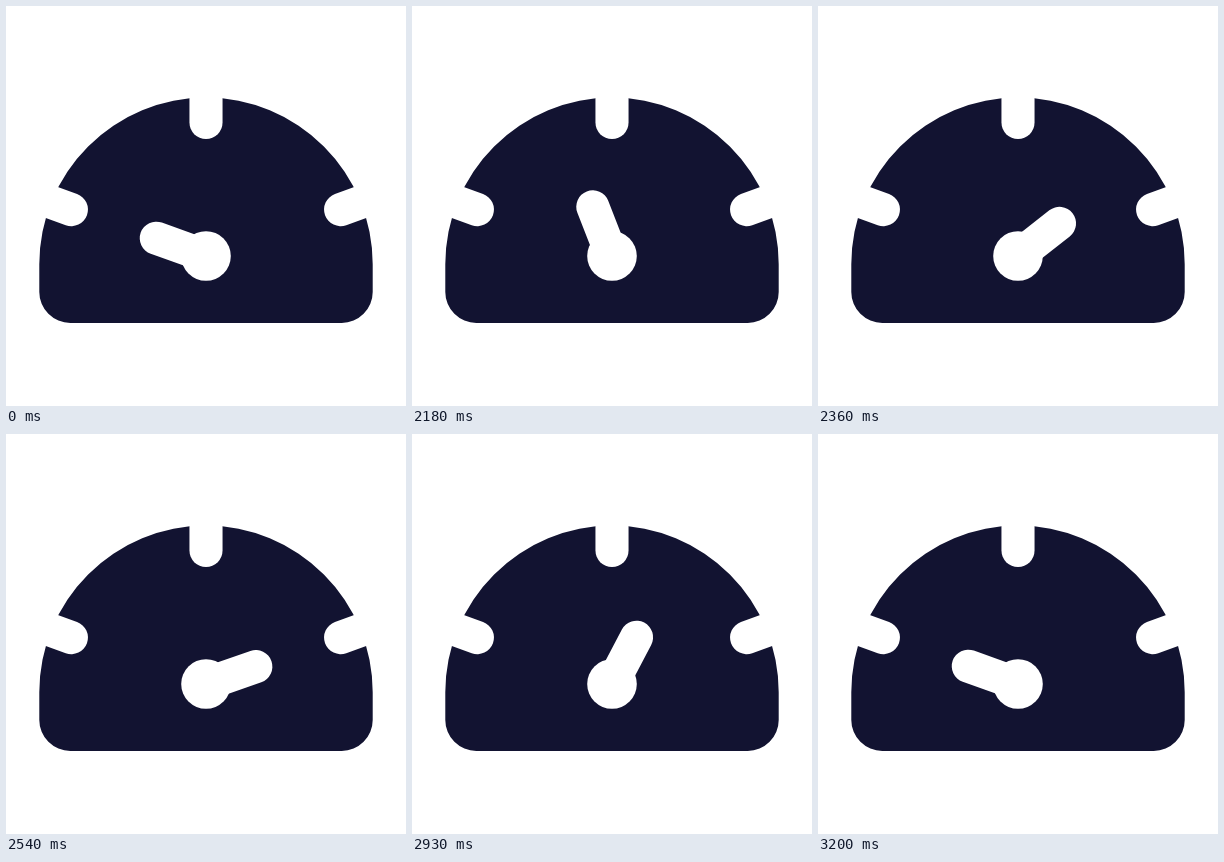
Write an HTML page with a canvas that moves like this. It is 400 by 400 pixels and loops after 3.26 s.

```html
<!DOCTYPE html>
<html lang="en">
<head>
<meta charset="utf-8">
<title>Gauge</title>
<style>
  html, body { margin: 0; width: 100%; height: 100%; overflow: hidden; background: #fff; }
  canvas { display: block; width: 400px; height: 400px; }
</style>
</head>
<body>
<canvas id="stage" width="400" height="400"></canvas>
<script>
const ctx = document.getElementById('stage').getContext('2d');

const LOOP = 3260, REST = 2000, STEP = 30;
const PEAK_STEP = 24, END_STEP = 40;
const LOW = -70.3, HIGH = 75;
const INK = '#121331', PAPER = '#fff';
const SLOT = 33.1;

// Cubic easing with flat ends; x1 and x2 are the handle positions in time.
function ease(x, x1, x2) {
  let lo = 0, hi = 1;
  for (let i = 0; i < 30; i++) {
    const u = (lo + hi) / 2, v = 1 - u;
    if (3 * u * v * v * x1 + 3 * u * u * v * x2 + u * u * u < x) lo = u;
    else hi = u;
  }
  return lo * lo * (3 - 2 * lo);
}

function needleAngle(time) {
  const step = Math.max(0, Math.min(END_STEP, Math.floor((time - REST) / STEP)));
  if (step === 0 || step === END_STEP) return LOW;
  const swing = step <= PEAK_STEP
    ? ease(step / PEAK_STEP, 0.4, 0.06)
    : 1 - ease((step - PEAK_STEP) / (END_STEP - PEAK_STEP), 0.667, 0.333);
  return LOW + (HIGH - LOW) * swing;
}

function slot(x1, y1, x2, y2) {
  ctx.beginPath();
  ctx.moveTo(x1, y1);
  ctx.lineTo(x2, y2);
  ctx.stroke();
}

function drawBody() {
  const left = 33.3, right = 366.7, bottom = 316.9, corner = 31;
  ctx.fillStyle = INK;
  ctx.beginPath();
  ctx.arc(200, 258.3, 166.7, Math.PI, 0);
  ctx.arcTo(right, bottom, 200, bottom, corner);
  ctx.arcTo(left, bottom, left, 258.3, corner);
  ctx.closePath();
  ctx.fill();
}

function draw(time) {
  ctx.fillStyle = PAPER;
  ctx.fillRect(0, 0, 400, 400);
  drawBody();

  ctx.strokeStyle = ctx.fillStyle = PAPER;
  ctx.lineWidth = SLOT;
  ctx.lineCap = 'round';
  slot(200, 116.5, 200, 60);
  slot(65.4, 203.6, 9, 183.1);
  slot(334.6, 203.6, 391, 183.1);

  const angle = needleAngle(time) * Math.PI / 180;
  slot(200, 250, 200 + 52.8 * Math.sin(angle), 250 - 52.8 * Math.cos(angle));
  ctx.beginPath();
  ctx.arc(200, 250, 24.8, 0, 2 * Math.PI);
  ctx.fill();
}

const start = performance.now();
function tick() {
  draw((performance.now() - start) % LOOP);
  requestAnimationFrame(tick);
}
tick();
</script>
</body>
</html>
```
